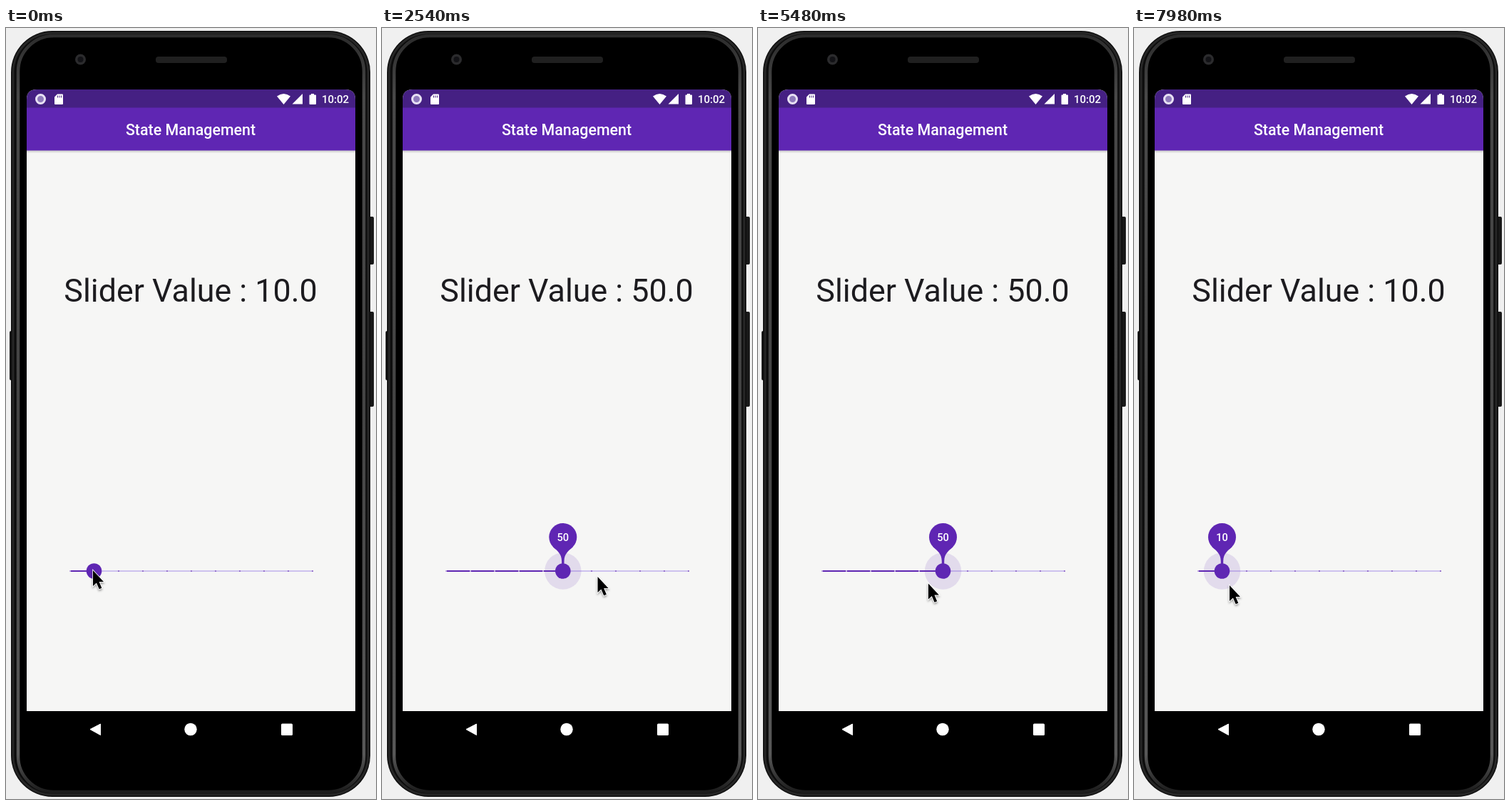
Write an HTML page that moves like this. It is 519 px wide and 1079 px high and loops after 8 s.

```html
<!DOCTYPE html>
<html lang="en">
<head>
<meta charset="utf-8">
<title>State Management</title>
<style>
  html, body { margin: 0; width: 100%; height: 100%; overflow: hidden; background: #f0f0f0; }
  svg { display: block; width: 519px; height: 1079px; }
  text { font-family: Roboto, sans-serif; text-anchor: middle; }
  .medium { font-weight: 500; fill: #fff; }
</style>
</head>
<body>
<svg viewBox="0 0 519 1079">
  <defs>
    <linearGradient id="rim" x1="0" y1="0" x2="0" y2="1">
      <stop offset="0" stop-color="#2c2c2c"/>
      <stop offset=".08" stop-color="#484848"/>
      <stop offset=".5" stop-color="#444"/>
      <stop offset=".95" stop-color="#585858"/>
      <stop offset="1" stop-color="#1c1c1c"/>
    </linearGradient>
    <linearGradient id="barShadow" x1="0" y1="0" x2="0" y2="1">
      <stop offset="0" stop-color="#000" stop-opacity=".18"/>
      <stop offset="1" stop-color="#000" stop-opacity="0"/>
    </linearGradient>
    <filter id="cursorShadow" x="-50%" y="-30%" width="200%" height="180%">
      <feDropShadow dx="0" dy="2" stdDeviation="1.5" flood-opacity=".4"/>
    </filter>
  </defs>

  <!-- Phone body -->
  <g fill="#191919">
    <rect x="508" y="264" width="8" height="67" rx="2"/>
    <rect x="508" y="397" width="8" height="133" rx="2"/>
    <rect x="5" y="424" width="8" height="69" rx="2"/>
  </g>
  <rect x="7" y="4" width="504" height="1072" rx="58" fill="#0c0c0c"/>
  <rect x="10" y="7" width="498" height="1066" rx="55" fill="none" stroke="#262626" stroke-width="3"/>
  <rect x="17" y="11" width="485" height="1058" rx="50" fill="#000" stroke="url(#rim)" stroke-width="4.500"/>
  <rect x="210" y="40" width="100" height="9" rx="4" fill="#202020"/>
  <circle cx="104.500" cy="44" r="7.500" fill="#2b2b2d"/>
  <circle cx="104.500" cy="44" r="4" fill="#121216"/>

  <!-- Screen -->
  <path d="M29 956V100Q29 86 43 86H476Q490 86 490 100V956Z" fill="#f6f6f5"/>
  <path d="M29 112V100Q29 86 43 86H476Q490 86 490 100V112Z" fill="#452083"/>
  <rect x="29" y="111.500" width="461" height="60" fill="#5f26b3"/>
  <rect x="29" y="171.500" width="461" height="4" fill="url(#barShadow)"/>
  <text class="medium" x="259" y="150" font-size="21.400">State Management</text>

  <!-- Status icons -->
  <circle cx="48.500" cy="99.500" r="6" fill="#8e7abb" stroke="#e8e1f4" stroke-width="3"/>
  <g fill="#fff">
    <path d="M72 92.500H79Q80 92.500 80 93.500V106Q80 107 79 107H69Q68 107 68 106V96.500Z"/>
    <path d="M380 95.500Q389.500 88.500 399 95.500L389.500 107Z"/>
    <path d="M416 92V106.500H401.500Z"/>
    <path d="M428 93.500V92H432V93.500H434Q435 93.500 435 94.500V106Q435 107 434 107H426.500Q425.500 107 425.500 106V94.500Q425.500 93.500 426.500 93.500Z"/>
  </g>
  <path d="M72.500 94.500v3M75 94.500v3M77.500 94.500v3" stroke="#452083" stroke-width="1"/>
  <text class="medium" x="462" y="105" font-size="15">10:02</text>

  <!-- Navigation bar -->
  <g fill="#fff">
    <path d="M118 981.500L132.500 974V989.500Z" stroke="#fff" stroke-width="1" stroke-linejoin="round"/>
    <circle cx="259" cy="981.500" r="8.700"/>
    <rect x="386" y="973.500" width="16" height="16.500" rx="1.500"/>
  </g>

  <text id="label" x="259" y="383" font-size="44.800" fill="#1c1b1f"></text>

  <!-- Slider -->
  <path d="M89.500 760H430.500" stroke="#cdc1ee" stroke-width="2.200"/>
  <path id="active" stroke="#5f26b3" stroke-width="2.200"/>
  <g id="ticks"></g>
  <g id="thumb" fill="#5f26b3">
    <circle id="halo" opacity=".13"/>
    <circle r="10.800"/>
    <g id="balloon">
      <circle cy="-47.500" r="19.500"/>
      <path d="M-14 -34C-8 -28 -2 -25 -1.700 -14V-8H1.700V-14C2 -25 8 -28 14 -34Z"/>
      <text id="balloonText" class="medium" y="-42.300" font-size="14.600"></text>
    </g>
  </g>

  <path id="cursor" d="M0 0V22L4.900 17.500L8.700 26.300L12.300 24.700L8.600 16H15Z"
    fill="#000" stroke="#fff" stroke-width="1.500" paint-order="stroke" filter="url(#cursorShadow)"/>
</svg>

<script>
const LOOP = 8000, PRESS = 500, TRACK_Y = 760;
const START = 10, STEP = 10, SLIDE = 150;
// Times at which the value goes up or down by one step
const UPS = [1580, 1870, 2180, 2430, 2680, 2930, 3200, 3820];
const DOWNS = [4450, 4785, 5060, 5290, 5560, 5800, 6120, 6450];
// Pointer path: time, x, y
const PATH = [
  [0, 122, 759], [1000, 122, 759], [1640, 194, 762], [1980, 224, 764],
  [2980, 364, 771], [3380, 374, 773], [3600, 400, 774], [4000, 404, 775],
  [4150, 398, 775], [4690, 331, 776], [4920, 301, 776], [6040, 177, 779],
  [6600, 134, 780], [LOOP, 134, 780]
];

const $ = id => document.getElementById(id);
const clamp = v => Math.min(1, Math.max(0, v));
const ease = v => { v = clamp(v); return v * v * (3 - 2 * v); };
const xOf = value => 89.5 + 3.4 * value;

const ticks = Array.from({ length: 11 }, (_, i) => {
  const dot = document.createElementNS('http://www.w3.org/2000/svg', 'circle');
  dot.setAttribute('cx', 90 + 34 * i);
  dot.setAttribute('cy', TRACK_Y);
  dot.setAttribute('r', 1.1);
  return $('ticks').appendChild(dot);
});

// Sum of the steps taken so far, each weighted by its progress
function valueAt(t, progress) {
  const total = times => times.reduce((sum, at) => sum + progress(t - at), 0);
  return START + STEP * (total(UPS) - total(DOWNS));
}

function pointerAt(t) {
  const i = PATH.findIndex(p => p[0] > t);
  const [t0, x0, y0] = PATH[i - 1], [t1, x1, y1] = PATH[i];
  const k = (t - t0) / (t1 - t0);
  return [x0 + (x1 - x0) * k, y0 + (y1 - y0) * k];
}

function draw(t) {
  const value = valueAt(t, dt => dt >= 0 ? 1 : 0);
  const x = xOf(valueAt(t, dt => ease(dt / SLIDE)));
  const press = ease((t - PRESS) / 100);

  $('label').textContent = `Slider Value : ${value.toFixed(1)}`;
  $('balloonText').textContent = value;
  $('active').setAttribute('d', `M89.5 ${TRACK_Y}H${x}`);
  $('thumb').setAttribute('transform', `translate(${x} ${TRACK_Y})`);
  $('halo').setAttribute('r', 25.7 * press);
  $('balloon').setAttribute('transform', `scale(${press})`);
  ticks.forEach((dot, i) => dot.setAttribute('fill', 90 + 34 * i < x ? '#c9b7e6' : '#8a62c6'));
  $('cursor').setAttribute('transform', `translate(${pointerAt(t).join(' ')})`);
}

const begin = performance.now();
function frame() {
  draw((performance.now() - begin) % LOOP);
  requestAnimationFrame(frame);
}
frame();
</script>
</body>
</html>
```
